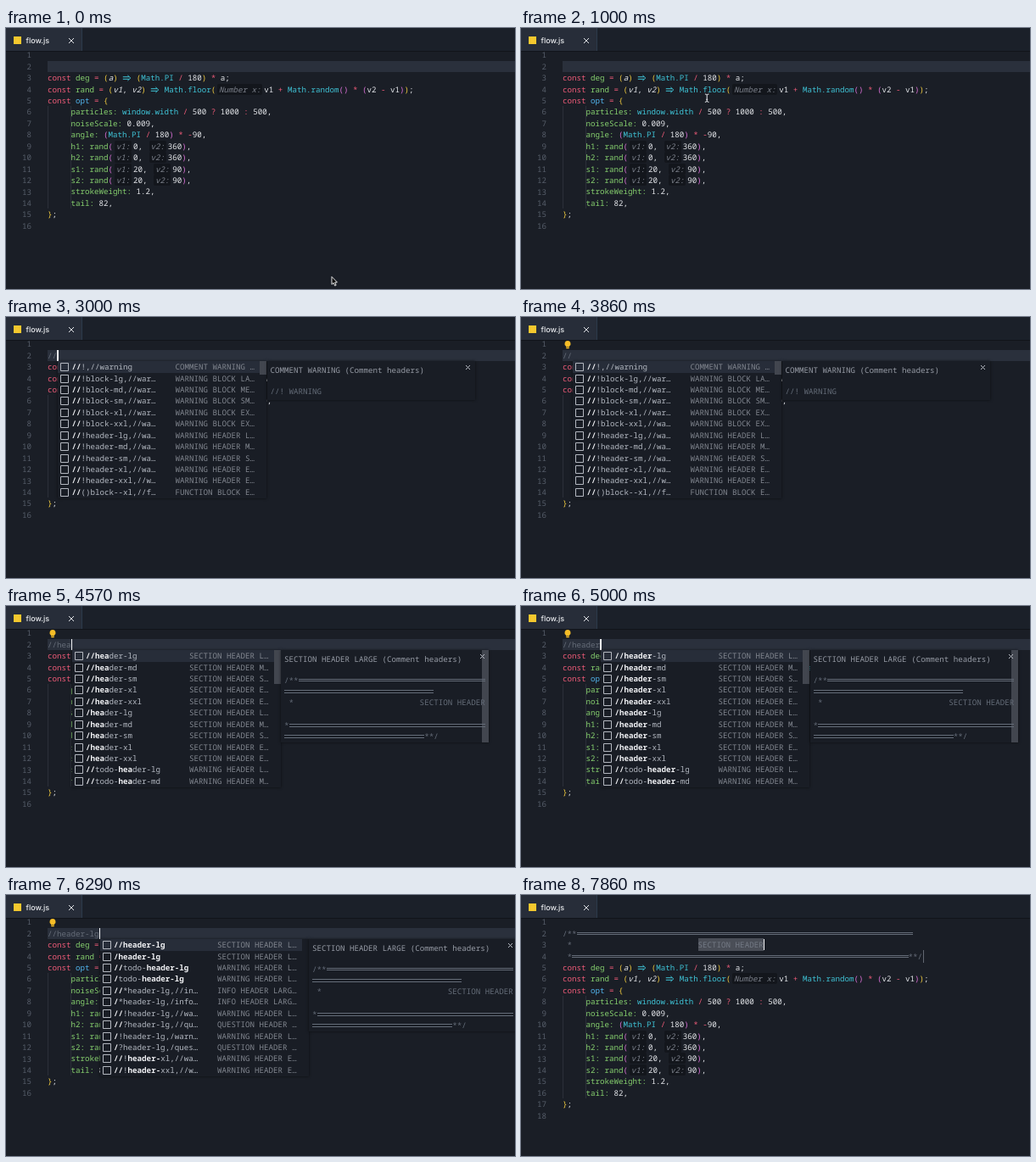
Animation of 600 by 308 pixels, one loop 8000 ms. Source, as an HTML page:

```html
<!DOCTYPE html>
<html lang="en">
<head>
<meta charset="utf-8">
<title>flow.js</title>
<style>
  :root { --ch: 5.508px; --row: 13.43px; }
  html, body { margin: 0; width: 100%; height: 100%; overflow: hidden; background: #1a1e26; }
  #stage {
    position: relative; width: 600px; height: 308px; overflow: hidden;
    background: #1a1e26; color: #e4e6ea;
    font: 500 9.18px/13.43px "Noto Sans Mono", "DejaVu Sans Mono", monospace;
    white-space: pre; text-rendering: geometricPrecision; font-variant-ligatures: none;
  }
  #stage div, #stage svg.abs { position: absolute; }
  [hidden] { display: none !important; }

  #bar { inset: 0 0 auto; height: 27px; background: #1b2029; border-bottom: 1px solid #11141a; z-index: 1; }
  #tab { left: 0; top: 0; width: 89px; height: 27px; background: #272d39; border-right: 1px solid #2b3a4a; }
  #icon { left: 8.5px; top: 10px; width: 9px; height: 9px; background: #f5c82e; }
  #name { left: 23.5px; top: 8.5px; font: 500 9px/13px Inter, Roboto, sans-serif; color: #eceef1; }

  #stage .layer { inset: 25.3px 0 auto 49px; }
  #stage .line { position: relative; height: var(--row); }
  #gutter { top: 25.3px; left: 0; width: 30px; text-align: right; color: #565d69; }
  #active { left: 49px; right: 0; top: 38.7px; height: 13.4px; background: #2a303c; }
  #caret { width: 1.6px; height: 13px; background: #f4f5f7; }
  #pop { top: 52.2px; }
  .in::before {
    content: ""; position: absolute; left: 0; top: 0; width: 26px; height: 100%;
    border: solid #2c3039; border-width: 0 1px;
  }

  .kw, .op { color: #ef5b78; }
  .fn { color: #86d06e; }
  .var { color: #52b5ee; }
  .lib, .arrow { color: #3fc3d6; }
  .b0 { color: #f4cd3f; }
  .b1 { color: #da70d6; }
  .com { color: #656c78; }
  i.hint {
    margin: 0 2px; padding: 0 1.75px; border-radius: 2px;
    background: #13161c; color: #7c818b;
  }
  svg { fill: none; stroke: currentColor; overflow: visible; }
  svg.arrow { width: 11.016px; height: 8px; vertical-align: -1px; }
  .rule {
    display: inline-block; box-sizing: border-box; height: 3.6px; vertical-align: 1.3px;
    border: solid currentColor; border-width: .9px 0;
  }
  .sel { background: #4a4e57; color: #747a85; padding: 1px 0; }
  .stop { border-left: 1px solid #626771; margin-left: 1px; padding: 1px 0; }

  #stage .list, #stage .info { background: #191d25; box-shadow: 0 0 3px #0009; overflow: hidden; top: 0; }
  .list { left: 1px; width: 246px; height: 161.4px; }
  #stage .item { position: relative; height: var(--row); width: 238px; color: #b3b8c1; }
  .item:first-child { background: #272d39; }
  .item b { color: #f0f1f4; font-weight: 700; }
  .item span, .item svg { position: absolute; top: 0; }
  .item svg { left: 3px; top: 2px; color: #b4b8c0; }
  .item .label { left: 16.5px; }
  .item .desc { left: 138.5px; color: #81868f; }
  .thumb { right: 0; top: 0; width: 8px; background: #42464f; }
  .info { left: 247.5px; width: 245px; color: #969ba5; }
  .head { left: 4px; top: 4.1px; }
  .text { left: 4px; top: 28.5px; width: 237.5px; overflow: hidden; line-height: 13.3px; color: #646c78; }
  .info svg { position: absolute; left: 234.5px; top: 4.5px; color: #b9bdc5; }
</style>
</head>
<body>
<div id="stage">
  <div id="active"></div>
  <div id="gutter"></div>
  <div id="before" class="layer"></div>
  <div id="after" class="layer"></div>
  <svg id="bulb" class="abs" style="left:51px;top:28px" width="8" height="10">
    <path fill="#f6bd27" stroke="none" d="M4 0a3.5 3.5 0 0 1 2 6.4V7.4H2V6.4A3.5 3.5 0 0 1 4 0zM2.3 8h3.4v1.3H2.3z"/>
  </svg>
  <div id="caret"></div>
  <div id="pop"></div>
  <div id="bar">
    <div id="tab"></div>
    <div id="icon"></div>
    <div id="name">flow.js</div>
    <svg class="abs" style="left:73.5px;top:12px" width="6" height="6"><path d="M0 0 6 6M6 0 0 6"/></svg>
  </div>
  <svg id="arrow" class="abs" style="left:0;top:0" width="8" height="12">
    <path fill="#000" stroke="#fff" stroke-width=".9" d="M0 0V9L2.1 7.2 3.6 10.6 5.1 10 3.7 6.6H6.4z"/>
  </svg>
  <svg id="beam" class="abs" style="left:0;top:0" width="6" height="10">
    <path stroke="#e8eaee" d="M-2.3 -4.7Q0 -4.7 0 -3.4Q0 -4.7 2.3 -4.7M0 -3.5V3.5M-2.3 4.7Q0 4.7 0 3.4Q0 4.7 2.3 4.7M-1 1.6H1"/>
  </svg>
</div>
<script>
const $ = id => document.getElementById(id);
const LOOP = 8000, CH = 5.508, LEFT = 49, EXPAND = 6720;
const QUERY = '//header-lg';
const KEYS = [2570, 2715, 4150, 4290, 4430, 4720, 4860, 5000, 5860, 6000, 6150];
const BLINKS = [1720, 1860, 2150, 3150, 3570, 3860, 4150, 5570, 5860, 7430, 7860];

const tag = (cls, s) => `<span class="${cls}">${s}</span>`;
const rule = n => `<span class="rule" style="width:${n * CH}px"></span>`;
const line = (html, cls = '') => `<div class="line ${cls}">${html}</div>`;
const passed = (times, t) => times.filter(k => t >= k).length;

// [x] is an inlay hint, _x_ an italic parameter
const CODE = `const deg = (_a_) => (Math.PI / 180) * a;
const rand = (_v1_, _v2_) => Math.floor([Number x:]v1 + Math.random() * (v2 - v1));
const opt = {
     particles: window.width / 500 ? 1000 : 500,
     noiseScale: 0.009,
     angle: (Math.PI / 180) * -90,
     h1: rand([v1:]0, [v2:]360),
     h2: rand([v1:]0, [v2:]360),
     s1: rand([v1:]20, [v2:]90),
     s2: rand([v1:]20, [v2:]90),
     strokeWeight: 1.2,
     tail: 82,
};`;

let depth = 0;
const TOKEN = /\[(.+?)\]|_(\w+)_|=>|\bconst\b|\bopt\b|\b(?:Math|window)\.\w+|\w+:|\b(?:deg|rand)\b|[({]|[)}]|[-=+*\/?:]/g;
function paint(s, hint, param) {
  if (hint) return `<i class="hint">${hint}</i>`;
  if (param) return `<i>${param}</i>`;
  if (s === '=>') return '<svg class="arrow" viewBox="0 0 11 8"><path d="M.8 2.7H8M.8 5.3H8M6.4.9 9.8 4 6.4 7.1"/></svg>';
  if (s === 'const') return tag('kw', s);
  if (s === 'opt') return tag('var', s);
  if (/^(Math|window)/.test(s)) return tag('lib', s);
  if (/^\w/.test(s)) return tag('fn', s);
  if (/[({]/.test(s)) return tag('b' + depth++ % 2, s);
  if (/[)}]/.test(s)) return tag('b' + --depth % 2, s);
  return tag('op', s);
}
const body = CODE.split('\n')
  .map(s => line(s.replace(TOKEN, paint), s[0] === ' ' ? 'in' : '')).join('');

$('before').innerHTML = line('') + line('<span id="typed" class="com"></span>') + body;
$('after').innerHTML = line('') +
  line('/**' + rule(72), 'com') +
  line(' *' + ' '.repeat(27) + tag('sel', 'SECTION HEADER'), 'com') +
  line(' *' + rule(72) + '**/' + tag('stop', ''), 'com') + body;

// Suggestion rows: label|description
const SIZES = ['lg', 'md', 'sm', 'xl', 'xxl'], INITIAL = 'LMSEE';
const sized = (label, desc) => SIZES.map((s, i) => `${label(s)}|${desc} HEADER ${INITIAL[i]}…`);
const cut = s => s.slice(0, 17) + '…';
const WARN = [
  '//!,//warning|COMMENT WARNING …',
  ...SIZES.map((s, i) => cut(`//!block-${s},//warning`) + '|WARNING BLOCK ' + ['LA', 'ME', 'SM', 'EX', 'EX'][i] + '…'),
  ...sized(s => cut(`//!header-${s},//warning`), 'WARNING'),
  '//()block--xl,//f…|FUNCTION BLOCK E…'
];
const HEADERS = [
  ...sized(s => '//header-' + s, 'SECTION'),
  ...sized(s => '/header-' + s, 'SECTION'),
  ...sized(s => '//todo-header-' + s, 'WARNING').slice(0, 2)
];
const LARGE = `//header-lg|SECTION HEADER L…
/header-lg|SECTION HEADER L…
//todo-header-lg|WARNING HEADER L…
/todo-header-lg|WARNING HEADER L…
//*header-lg,//in…|INFO HEADER LARG…
/*header-lg,/info…|INFO HEADER LARG…
//!header-lg,//wa…|WARNING HEADER L…
//?header-lg,//qu…|QUESTION HEADER …
/!header-lg,/warn…|WARNING HEADER L…
/?header-lg,/ques…|QUESTION HEADER …
//!header-xl,//wa…|WARNING HEADER E…
//!header-xxl,//w…|WARNING HEADER E…`.split('\n');

function item(row, word) {
  const [label, desc] = row.split('|');
  const hit = word ? new RegExp(`^/+|${word}(?!.*,)|header-(?=x)`, 'g') : /^\/+/;
  return `<div class="item"><svg width="10" height="10"><path d="M.5 .5H9.5V9.5H.5z"/></svg>` +
    tag('label', label.replace(hit, '<b>$&</b>')) + tag('desc', desc) + '</div>';
}

function popup(text, details, scroll) {
  const word = text.slice(2), n = text.length;
  const rows = !word ? WARN : n > 9 ? LARGE : HEADERS;
  const thumb = !word ? 16 : n > 9 ? 0 : 40;
  const title = word ? 'SECTION HEADER LARGE' : 'COMMENT WARNING';
  const sample = word
    ? ['/**' + rule(40), rule(32), ' *' + ' '.repeat(27) + 'SECTION HEADER', '', '*' + rule(42), rule(30) + '**/'].join('\n')
    : '//! WARNING';
  const list = `<div class="list">${rows.map(r => item(r, word)).join('')}<div class="thumb" style="height:${thumb}px"></div></div>`;
  const info = `<div class="info" style="height:${word ? 109 : 46}px">` +
    (scroll ? '<div class="thumb" style="height:109px"></div>' : '') +
    `<div class="head">${title} (Comment headers)</div>` +
    `<svg width="5" height="5"><path d="M0 0 5 5M5 0 0 5"/></svg><div class="text">${sample}</div></div>`;
  return list + (details ? info : '');
}

let shown = '';
function render(t) {
  const done = t >= EXPAND;
  const text = QUERY.slice(0, passed(KEYS, t));
  const open = t >= 2860 && !done, details = t >= 3000;
  const scroll = t >= 4150 && t < 5290;
  $('before').hidden = $('active').hidden = done;
  $('after').hidden = !done;
  $('bulb').style.display = t >= 3430 && !done ? '' : 'none';
  $('pop').hidden = !open;

  const key = [text, done, open, details, scroll].join();
  if (key !== shown) {
    shown = key;
    $('typed').textContent = text;
    $('gutter').textContent = Array.from({ length: done ? 18 : 16 }, (_, i) => i + 1).join('\n');
    if (open) $('pop').innerHTML = popup(text, details, scroll);
  }

  const x = LEFT + CH * (done ? 43 : text.length);
  $('pop').style.left = x + 'px';
  $('caret').style.left = x + 'px';
  $('caret').style.top = (done ? 52.2 : 38.9) + 'px';
  $('caret').hidden = passed(BLINKS, t) % 2 === 0;

  // Pointer glides up to line 2 and hides while typing
  const p = Math.min(1, Math.max(0, (t - 100) / 1190));
  const e = p * p * (3 - 2 * p);
  const mx = 384 - 193.5 * e, my = 293.5 - 247.5 * e;
  const beam = my < 250;
  for (const [id, on] of [['arrow', !beam], ['beam', beam]]) {
    $(id).style.transform = `translate(${mx}px,${my}px)`;
    $(id).style.display = on && t < KEYS[0] ? '' : 'none';
  }
}

function tick() {
  render(performance.now() % LOOP);
  requestAnimationFrame(tick);
}
tick();
</script>
</body>
</html>
```
